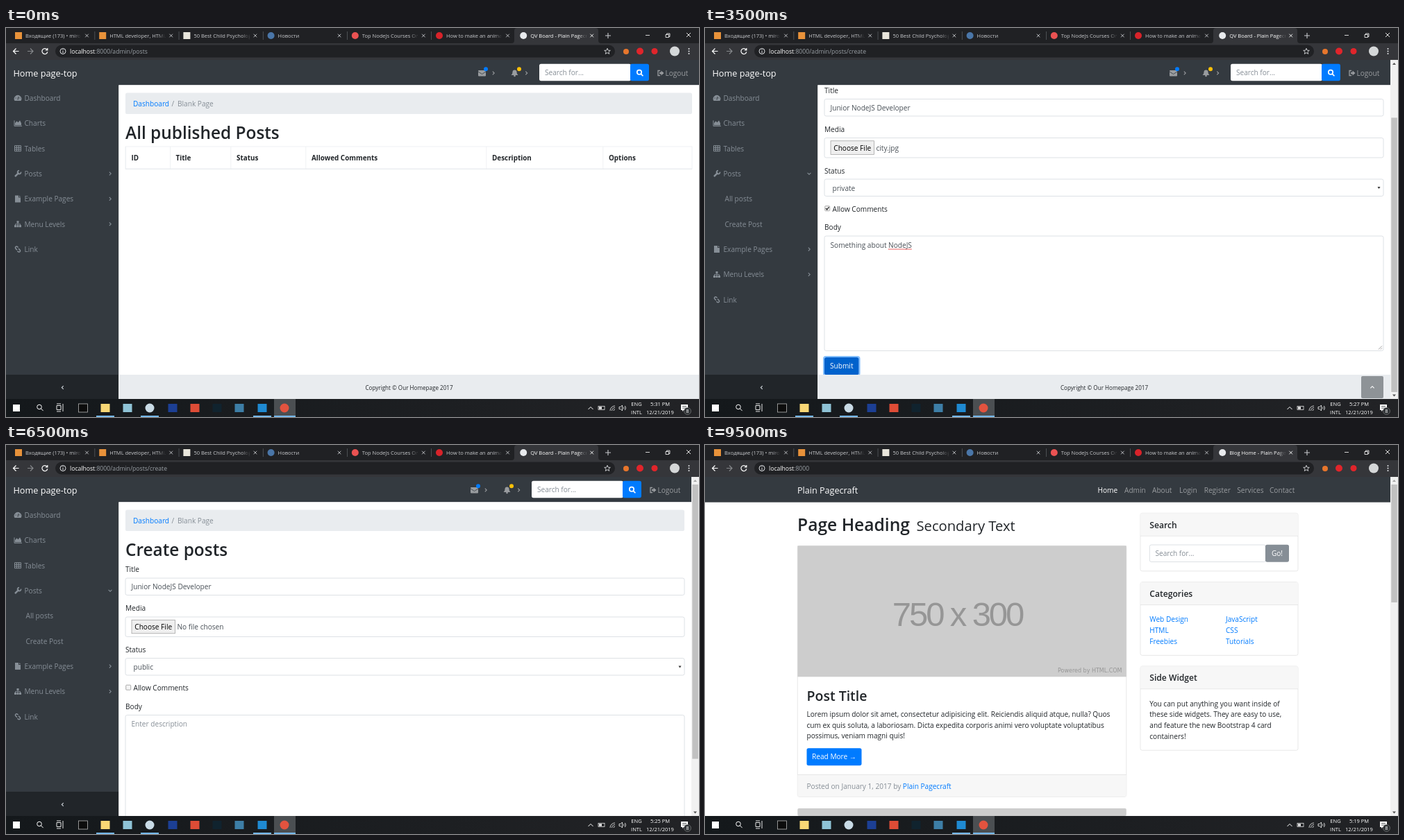
These frames come from a looping animation (998 by 561 pixels, 10 s). An HTML page:

```html
<!DOCTYPE html>
<html lang="en">
<head>
<meta charset="utf-8">
<title>Posts admin walkthrough</title>
<style>
html, body { margin: 0; height: 100%; overflow: hidden; background: #fff; }
svg { display: block; }
#stage { width: 100vw; height: 100vh; font-family: "Open Sans", "Noto Sans", sans-serif; }
</style>
</head>
<body>
<svg id="stage" viewBox="0 0 998 561"></svg>
<script>
const BLUE = '#007bff', DARK = '#343a40', INK = '#212529', GREY = '#868e96', PALE = '#e9ecef', FIELD = '#495057';
const BODY = 10.1, LEFT = 162.3, TOP = 82.3;
const brand = 'Plain Pagecraft';
const id = '5dfe39f7f0d8c414dc37040d';
const title = 'Junior NodeJS Developer';
const long = 'Something about Junior Development on NodeJS', short = 'Something about NodeJS';

// Drawing helpers
const R = (x, y, w, h, fill, more = '') => `<rect x="${x}" y="${y}" width="${w}" height="${h}" fill="${fill}" ${more}/>`;
const C = (x, y, r, fill, more = '') => `<circle cx="${x}" cy="${y}" r="${r}" fill="${fill}" ${more}/>`;
const T = (x, y, s, fill = INK, size = BODY, more = '') => `<text x="${x}" y="${y}" fill="${fill}" font-size="${size}" ${more}>${s}</text>`;
const P = (d, stroke, w = 1, fill = 'none', more = '') => `<path d="${d}" stroke="${stroke}" stroke-width="${w}" fill="${fill}" ${more}/>`;
const at = (x, y, s) => `<g transform="translate(${x} ${y})">${s}</g>`;
const clip = (x, y, w, h, s) => `<svg x="${x}" y="${y}" width="${w}" height="${h}" viewBox="${x} ${y} ${w} ${h}">${s}</svg>`;
const line = c => `stroke="${c}" stroke-width=".7"`;
const MID = 'text-anchor="middle"', SEMI = 'font-weight="600"', BOLD = 'font-weight="700"';
const chevron = (x, y, dir, c, s = 2.4) => at(x, y, `<g transform="rotate(${dir})">${P(`M${-s / 2} ${-s}L${s / 2} 0L${-s / 2} ${s}`, c, 1.1)}</g>`);
const cross = (x, y, s, c, w = .9) => P(`M${x - s} ${y - s}l${2 * s} ${2 * s}m0 ${-2 * s}l${-2 * s} ${2 * s}`, c, w);
const lens = (x, y, s, c, w) => C(x, y, s, 'none', `stroke="${c}" stroke-width="${w}"`) + P(`M${x + s * .7} ${y + s * .7}l${s} ${s}`, c, w);
const ring = (x, y, w, h, c) => R(x - 1, y - 1, w + 2, h + 2, 'none', `rx="3" stroke="${c}" stroke-width="2"`);
const field = (x, y, w, h, on) => (on ? ring(x, y, w, h, '#bfdeff') : '') + R(x, y, w, h, '#fff', `rx="2.5" ${line(on ? '#80bdff' : '#ced4da')}`);
const button = (x, y, w, s, fill, glow) => (glow ? ring(x, y, w, 25, glow) : '') +
  R(x, y, w, 25, fill, 'rx="2.6"') + T(x + w / 2, y + 16, s, '#fff', BODY, MID);

const pen = document.createElement('canvas').getContext('2d');
const width = s => {
  pen.font = BODY + 'px "Open Sans", "Noto Sans", sans-serif';
  return pen.measureText(s).width;
};

// Browser window
function browser(f) {
  const strip = f.dialog ? '#3c4043' : '#202124', bar = '#35363a';
  const soft = f.dialog ? '#a5a8ac' : '#c8cacd', ctl = f.dialog ? '#85888b' : '#fff';
  const fade = (name, c) => `<linearGradient id="${name}"><stop stop-color="${c}" stop-opacity="0"/><stop offset="1" stop-color="${c}"/></linearGradient>`;
  const tabs = [
    ['Входящие (173) • mirota', '#e8923a'], ['HTML developer, HTML jobs', '#e8923a'],
    ['50 Best Child Psychology', '#e9e6dc'], ['Новости', '#4a76a8'], ['Top NodeJs Courses Online', '#ea5252'],
    ['How to make an animation', '#d8232a'], [(f.p === home ? 'Blog Home - ' : 'QV Board - ') + brand, '#e8eaed']];
  let s = `<defs>${fade('fadeTab', strip)}${fade('fadeOn', bar)}</defs>` + R(0, 0, 998, 22, strip) +
    P('M728 22q4 0 4 -4v-14q0 -4 4 -4h113q4 0 4 4v14q0 4 4 4z', 'none', 0, bar);
  tabs.forEach(([name, c], i) => {
    const x = 18 + i * 121.2, on = i === 6;
    s += (i > 2 ? C(x, 11, 5, c) : R(x - 5, 6, 10, 10, c)) +
      clip(x + 10, 2, 80, 18, T(x + 10, 13.7, name, on ? '#fff' : soft, 7.5) + R(x + 79, 2, 11, 18, `url(#${on ? 'fadeOn' : 'fadeTab'})`)) +
      cross(x + 98.5, 11, 2.3, on ? '#fff' : soft) + (i < 5 ? R(x + 109.5, 5, .7, 12, '#5f6368') : '');
  });
  s += P('M863 11h8M867 7v8', soft, 1.1) + P('M921 10.5h6M950 9.5h4.5v4h-4.5zM951.5 9.5v-1.5h4.5v4.5h-1.5', ctl, .8) + cross(983, 10, 3, ctl);
  s += R(0, 22, 998, 24, bar) + P('M18.5 33.5h-8M14.5 29.5l-4 4 4 4', '#fff', 1.2) + P('M31 33.5h8M35 29.5l4 4 -4 4', '#85888b', 1.2) +
    P('M59 31a4 4 0 1 0 .8 3.5M59.8 29v3h-3', '#fff', 1.2) + R(71, 24.5, 806, 18, '#202124', 'rx="9"') +
    C(82, 33.5, 4, 'none', 'stroke="#e8eaed"') + P('M82 33v3M82 31v1', '#e8eaed') +
    T(92, 37, `<tspan fill="#fff">localhost</tspan>:8000${f.url || ''}`, '#9aa0a6', 8.64) +
    P('M866 29.3l1.2 2.9 3.1 .2 -2.4 2 .8 3 -2.7 -1.7 -2.7 1.7 .8 -3 -2.4 -2 3.1 -.2z', '#d5d7da', .9) +
    C(893, 34, 4, '#e8762c') + C(913, 33.5, 5, '#e1252b') + C(934, 33.5, 4.5, '#e1252b') + C(963, 33.5, 7, '#d5d7d8');
  for (const y of [30, 33.5, 37]) s += C(983.5, y, 1, '#e8eaed');
  return s;
}

function scrollbar(top, end) {
  return R(987, 46, 11, 489, '#f1f1f1') + R(988.3, top, 8.6, end - top, '#c1c1c1') +
    P('M990 53l2.5 -3 2.5 3z', 'none', 0, top > 57 ? '#505050' : '#a3a3a3') + P('M990 528.5l2.5 3 2.5 -3z', 'none', 0, '#505050');
}

function taskbar(f) {
  const icons = [[111, '#0c0c0c'], [143, '#f8d775'], [175, '#8fc3d6'], [207, '#c9dbe6', 1], [240, '#1c3f94'],
    [272, '#de4c36'], [304, '#10232e'], [336, '#3d7ea6'], [369, '#1f8ad2'], [401, '#e2533f', 1]];
  if (f.photo) icons.push([433, '#fff']);
  const open = [369];
  if (f.m > 19) open.push(207);
  if (f.m > 21) open.push(143);
  if (f.photo === 2) open.push(433);
  let s = '<defs><linearGradient id="task"><stop stop-color="#14181b"/><stop offset="1" stop-color="#222326"/></linearGradient></defs>' +
    R(0, 535, 998, 26, 'url(#task)') + R(386, 535, 31, 26, '#4b4f52') + R(386, 559, 31, 2, '#76b9ed') + R(10, 543, 10, 10, '#fff') +
    lens(48, 546.5, 3.3, '#fff', 1) + P('M73 544.5h6v6h-6zM73 542h6M73 553h6M82 542v11', '#e6e6e6');
  for (const [x, c, round] of icons)
    s += round ? C(x, 548, 6.5, c) : R(x - 6.5, 542, 13, 12, c, x === 111 ? 'stroke="#b5b5b5" stroke-width=".8"' : '');
  for (const x of open) s += R(x - 13, 559, 26, 2, '#76b9ed');
  const w = (y, t, x) => T(x, y, t, '#fff', 7.5, MID);
  return s + P('M838.5 550l3.5 -3.5 3.5 3.5', '#fff') + R(853, 545.5, 9, 5, 'none', line('#fff')) + R(854, 546.5, 4, 3, '#fff') +
    P('M870 552a7 7 0 0 1 7 -7M872.5 552a4.5 4.5 0 0 1 4.5 -4.5M875 552a2 2 0 0 1 2 -2', '#ddd', .9) +
    P('M883 546.5h2l2.5 -2.5v8l-2.5 -2.5h-2zM889.5 546.5q1 1.5 0 3M891.5 545q2 3 0 6', '#fff', .8) +
    w(545, 'ENG', 908) + w(556.5, 'INTL', 908) + w(545, `5:${f.m} PM`, 942) + w(556.5, '12/21/2019', 942) +
    P('M972 543h10v8h-6l-2 2v-2h-2z', 'none', 0, '#fff') + P('M974 545.5h6M974 548h6', '#14181b', .7) +
    C(981.5, 552.5, 5, '#2c3033', 'stroke="#888" stroke-width=".6"') + w(555.2, '8', 981.5);
}

// Admin pages
const icons = {
  Dashboard: c => P('M-4.5 4a5.3 5.3 0 1 1 9 0z', 'none', 0, c) + P('M0 2.5l1 -4.5M-3.4 0h1M2.4 0h1', DARK, 1.1),
  Charts: c => P('M-5 -4v8h11', c, 1) + P('M-4 3v-3l2.5 -3 2 2 2.5 -3 2 4v3z', 'none', 0, c),
  Tables: c => P('M-4.5 -4h9v8h-9zM-4.5 -1.3h9M-4.5 1.3h9M-1.5 -4v8M1.5 -4v8', c, 1),
  Posts: c => P('M-4 4L1.5 -1.5', c, 2.4) + P('M4.5 -2.5A2.5 2.5 0 1 1 2 -4.5', c, 1.7),
  'Example Pages': c => P('M-4 -5h5v3h3v7h-8zM2 -5l2 2h-2z', 'none', 0, c),
  'Menu Levels': c => P('M-1.5 -4.5h3v3h-3zM-5 1.5h3v3h-3zM-1.5 1.5h3v3h-3zM2 1.5h3v3h-3z', 'none', 0, c) + P('M0 -2v4M-3.5 2v-2h7v2', c, .9),
  Link: c => P('M-1 1l-2 -2a1.7 1.7 0 0 1 0 -2.5 1.7 1.7 0 0 1 2.5 0l1 1M1 -1l2 2a1.7 1.7 0 0 1 0 2.5 1.7 1.7 0 0 1 -2.5 0l-1 -1', c, 1.5)
};

function sidebar(f) {
  let s = R(0, 82, LEFT, 418, DARK) + R(0, 500, LEFT, 35, INK) + chevron(81.5, 518.5, 180, '#ced4da'), y = 101;
  const step = 36.35;
  for (const name in icons) {
    const c = f.hover === name ? '#ced4da' : GREY;
    s += at(17, y, icons[name](c)) + T(26.5, y + 4, name, c);
    if (/Posts|Pages|Levels/.test(name)) s += chevron(150, y, name === 'Posts' && f.expanded ? 90 : 0, c);
    y += step;
    if (name === 'Posts' && f.expanded) for (const sub of ['All posts', 'Create Post']) {
      s += T(28.5, y + 4, sub, f.hover === sub ? '#ced4da' : GREY);
      y += step;
    }
  }
  return s;
}

function navbar(dx) {
  const c = '#999c9f';
  return R(0, 46, 998, TOP - 46, DARK) + T(10.5, 70, 'Home page-top', '#fff', 12.7) + at(dx, 0,
    R(680, 61, 11, 8.5, c, 'rx="1"') + P('M680 63l5.5 3.5 5.5 -3.5', DARK, .8) + C(691, 59.3, 3, BLUE) + chevron(702, 65, 0, c) +
    P('M727.5 68q2 -1.5 2 -4.5 0 -3 3 -3 3 0 3 3 0 3 2 4.5z', 'none', 0, c) + C(732.5, 69, 1.3, c) + C(739, 59.3, 3, '#ffc107') + chevron(749.5, 65, 0, c) +
    R(768, 51.7, 132, 24.5, '#fff', 'rx="2.6"') + T(776, 68.2, 'Search for...', GREY) + R(899, 51.7, 27, 24.5, BLUE, 'rx="2.6"') + lens(912, 63.8, 3.2, '#fff', 1.7) +
    P('M942 61.5h-3v7h3', c, 1.3) + P('M941 63.7h2.5v-2.2l4 3.5 -4 3.5v-2.2h-2.5z', 'none', 0, c) + T(949.5, 68.7, 'Logout', c));
}

function admin(f, heading, content, max = 0) {
  const y = f.y || 0, right = max ? 977 : 988, foot = 500 + max;
  const main = R(172, 93.5, right - 172, 30.5, PALE, 'rx="2.6"') + T(183, 113, 'Dashboard', BLUE) + T(238.5, 113, '/', GREY) + T(247, 113, 'Blank Page', GREY) +
    T(172, 160, heading, INK, 24.4, SEMI) + content + R(LEFT, foot, 836, 35, PALE) +
    T((right + 173) / 2, foot + 21.7, 'Copyright © Our Homepage 2017', INK, 8.1, MID);
  let s = navbar(max ? -11 : 0) + sidebar(f) + clip(LEFT, TOP, 998 - LEFT, 535 - TOP, R(LEFT, TOP, 836, 453, '#fff') + at(0, -y, main));
  if (max) {
    const k = 468 / (489 + max);
    s += R(987, 46, 11, 489, '#fff') + scrollbar(57 + y * k, 57 + (y + 489) * k);
  }
  if (y > 65) s += R(945, 502, 32, 32, DARK, 'opacity=".5" rx="2"') + chevron(961, 518, -90, '#fff', 2.6);
  return s;
}

function list(f) {
  const cols = !f.body ? [172, 236, 323.5, 431.5, 691.5, 859.5] : f.body === long ? [172, 324, 460, 511, 627, 882] : [172, 346, 501, 559, 692, 851];
  const heads = ['ID', 'Title', 'Status', 'Allowed Comments', 'Description', 'Options'];
  const row = [id, title, 'private', 'true', f.body];
  const bottom = f.body ? 244.5 : 203.5;
  let s = R(172, 171, 816, bottom - 171, 'none', line(PALE)) + R(172, 202.6, 816, 1.3, PALE);
  cols.forEach((x, i) => {
    s += R(x, 171, .7, bottom - 171, PALE) + T(x + 8.5, 191.2, heads[i], INK, 9.9, BOLD);
    if (f.body && row[i]) s += T(x + 8.5, 223, row[i]);
  });
  if (f.body) {
    const x = cols[5] + 8;
    s += button(x, 211.5, 37, 'Edit', f.focus === 'edit' ? '#117a8b' : '#17a2b8') +
      button(x + 40, 211.5, 48, 'Delete', f.focus === 'del' ? '#c82333' : '#dc3545', f.focus === 'del' && '#eda1a8');
  }
  return admin(f, 'All published Posts', s);
}

const blank = f => admin(f, 'Blank', T(172, 180, 'This is an example of a blank page.'));

function form(f) {
  const on = name => f.focus === name, hint = (s, alt) => [s || alt, s ? FIELD : GREY];
  const d = f.edit ? -59.5 : 0, W = 805, set = f.status === 'private';
  let s = T(172, 183, 'Title') + field(172, 192, W, 24.5, on('title')) + T(180.5, 208.3, ...hint(f.title, 'Enter title'));
  if (on('title')) s += R(181 + width(f.title), 198.5, .7, 12, INK);
  if (!f.edit) s += T(172, 239.2, 'Media') + field(172, 248, W, 28.5) + R(181, 252.3, 62.5, 19.5, '#efefef', line('#999')) +
    T(212.2, 266, 'Choose File', '#000', BODY, MID) + T(246.5, 266, f.file || 'No file chosen', FIELD);
  let low = T(172, 299, 'Status') + field(172, 307.5, W, 24.5, f.open) + T(183.5, 324, f.status || 'public', FIELD) +
    P('M968.5 318.5h4l-2 3z', 'none', 0, '#333') +
    R(172.7, 346.2, 7, 7, '#f4f4f4', 'rx="1" ' + line('#8a8a8a')) + (set ? P('M174 349.5l1.7 2 2.8 -4', '#222', 1.3) : '') + T(183.5, 354.3, 'Allow Comments') +
    T(172, 380.7, 'Body') + field(172, 389.5, W, 165.5, on('body')) + T(180.5, 406, ...hint(f.body, 'Enter description')) +
    P('M970 553l5 -5M973 553l2 -2', '#777', .7) +
    button(172, 564.5, 49.5, 'Submit', on('submit') ? '#0062cc' : BLUE, on('submit') && '#80bdff');
  if (f.body) {
    const end = 180.5 + width(f.body), word = width('NodeJS');
    low += P(`M${end - word} 408.5h${word}`, '#e01010', 1, 'none', 'stroke-dasharray="1.3 .7"');
    if (on('body')) low += R(end + .3, 396, .7, 13, INK);
  }
  if (f.open) {
    low += R(172, 332, W, 44, '#fff', line('#7a9cc0')) + R(172.4, 332, W - .8, 14.6, '#1e90ff');
    ['public', 'private', 'draft'].forEach((t, i) => low += T(183.5, 343.3 + i * 14.6, t, i ? FIELD : '#fff'));
  }
  return admin(f, f.edit ? 'Edit posts' : 'Create posts', s + at(0, d, low), 89.5 + d);
}

// File picker
function dialog(picked) {
  const w = (x, y, t, more) => T(x, y, t, '#f2f2f2', 7.4, more), box = (x, y, wd, h, fill, c) => R(x, y, wd, h, fill, line(c));
  const tree = [['This PC', '#4aa8dc'], ['3D Objects', '#35b5cf'], ['Desktop', '#1a9bf0'], ['Documents', '#b9d3e3'], ['Downloads', '#2b8de0'], ['Music', '#2a9df4'],
    ['Pictures', '#9cc4dc'], ['Videos', '#8a8fa8'], ['Local Disk (C:)', '#c8ccd0'], ['Local Disk (D:)', '#c8ccd0'], ['New Volume (E:)', '#c8ccd0']];
  let nav = R(355, 232.3, 90, 14.7, '#3d3d3d');
  tree.forEach(([t, c], i) => {
    const x = i ? 388 : 383, y = 208.5 + i * 15.6;
    nav += R(x - 12, y - (i > 7 ? 1 : 3.5), 9, i > 7 ? 4 : 7, c, 'rx="1"') + w(x, y + 2.8, t);
  });
  nav += R(371, 380, 9, 7, '#4aa8dc') + w(383, 387.5, 'Network');
  let photo = R(472.5, 223.5, 57, 36.5, 'url(#dusk)');
  for (let i = 0; i < 14; i++) {
    const h = 8 + 7 * Math.abs(Math.sin(i * 2.3));
    photo += R(473 + i * 4, 260 - h, 3.6, h, i % 2 ? '#40364a' : '#5a4650');
  }
  photo += P('M499 260v-20l2 -7 2 7v20z', 'none', 0, '#4b3f4d');
  return '<defs><linearGradient id="dusk" x2="0" y2="1"><stop stop-color="#54505c"/><stop offset=".45" stop-color="#d59a6c"/><stop offset="1" stop-color="#4a3540"/></linearGradient></defs>' +
    '<g style="filter:drop-shadow(0 2px 5px #0008)">' + R(354.4, 129.4, 490, 306.5, '#202020', line('#5a5a5a')) + '</g>' +
    R(355, 130, 489, 19, '#000') + C(364.5, 139, 4.3, '#e2533f') + w(372, 141.8, 'Open') + cross(833, 139, 3, '#fff') + R(355, 149, 489, 46, '#191919') +
    P('M371 161.5h-7.5M366.5 158.5l-3 3 3 3M383 161.5h7.5M387.5 158.5l3 3 -3 3', '#8d8d8d') + chevron(402.5, 161.5, 90, '#8d8d8d') +
    P('M416 165.5v-7.5M413 161l3 -3 3 3', '#fff', 1.2) + box(423.5, 151.5, 277, 19.5, '#191919', '#535353') + R(426, 157.5, 9.5, 7, '#1a9bf0') +
    chevron(442, 161, 0, '#ccc', 1.8) + w(449, 164, 'This PC') + chevron(480.5, 161, 0, '#ccc', 1.8) + w(487.5, 164, 'Desktop') + chevron(667.5, 161.5, 90, '#ccc') +
    P('M691.5 159.5a3.3 3.3 0 1 0 .6 2.5M692 158v2.2h-2.2', '#bbb', .9) + box(706.5, 151.5, 131, 19.5, '#191919', '#535353') +
    at(720, 160.5, '<g transform="scale(-1 1)">' + lens(0, 0, 2.7, '#999', .8) + '</g>') + T(732.5, 164, 'Search Desktop', '#9a9a9a', 7.4) +
    w(365.5, 188, 'Organize') + P('M400 184l2 2.2 2 -2.2z', 'none', 0, '#eee') + w(423, 188, 'New folder') +
    R(765.5, 181.5, 9, 7, '#b8d8ea') + P('M781.5 184l2 2.2 2 -2.2z', 'none', 0, '#eee') + R(800.5, 181.5, 9, 7, '#fff') + R(805.5, 182.5, 3.5, 5.5, '#2b8de0') +
    C(829, 185, 4.6, '#0a6cd6') + w(829, 188, '?', MID) +
    R(355, 195, 101, 189, '#191919') + clip(355, 195, 90, 189, nav) + R(445, 195, 11, 189, '#171717') + R(445.5, 273, 10, 92, '#4d4d4d') +
    chevron(450.5, 200.5, -90, '#aaa') + chevron(450.5, 378.5, 90, '#aaa') + (picked ? R(468.5, 200, 67, 75.5, '#333') : '') + photo + w(502, 271.5, 'city.jpg', MID) +
    R(355, 384, 489, 51.5, '#383838') + w(466.5, 402.3, 'File <tspan text-decoration="underline">n</tspan>ame:', 'text-anchor="end"') +
    box(469.5, 392.5, 234, 14.5, '#383838', '#8a8a8a') + (picked ? w(471.5, 402.3, 'city.jpg') : '') + chevron(698.5, 399.7, 90, '#aaa') +
    box(711.5, 392.5, 122, 14.5, '#383838', '#8a8a8a') + w(714, 402.3, 'All Files (*.*)') + chevron(828, 399.7, 90, '#aaa') +
    box(711.5, 411.3, 57, 16.5, '#666', '#b0b0b0') + w(740, 422.3, '<tspan text-decoration="underline">O</tspan>pen', MID) +
    box(776.5, 411.3, 57, 16.5, '#333', '#d0d0d0') + w(805, 422.3, 'Cancel', MID) +
    P('M842 429.5v5M839.5 432v2.5M837 434.5v-1.5', '#aaa', 1.2, 'none', 'stroke-dasharray="1.3 1"');
}

// Public blog page
function home() {
  const edge = line('#dfdfdf'), lines = (x, y, rows) => rows.map((t, i) => T(x, y + i * 15.6, t)).join('');
  const card = (y, h, name) => R(627, y, 227, h, '#fff', 'rx="2.6" ' + edge) + R(627.3, y + .3, 226.4, 32.4, '#f7f7f7') +
    R(627, y + 32.5, 227, .7, '#dfdfdf') + T(640.3, y + 21.3, name, INK, 12.1, SEMI);
  let s = R(0, 46, 987, 36.6, DARK) + T(133, 70, brand, '#fff', 12.6);
  [['Home', 565.5], ['Admin', 604], ['About', 644], ['Login', 683], ['Register', 718.7], ['Services', 766.3], ['Contact', 813]]
    .forEach(([t, x], i) => s += T(x, 68.8, t, i ? '#999c9f' : '#fff'));
  s += T(133, 124, 'Page Heading', INK, 24.6, SEMI) + T(304.5, 124, 'Secondary Text', INK, 20.2) +
    R(133.3, 145.3, 473.5, 362, '#fff', 'rx="2.6" ' + edge) + R(133.3, 145.3, 473.5, 189, '#cdcdcd') +
    T(363.5, 261, '750 x 300', '#969696', 49, MID + ' font-family="Liberation Sans, Arial, sans-serif" letter-spacing="-3.1"') +
    T(600.5, 328, 'Powered by HTML.COM', '#969696', 8, 'text-anchor="end" font-family="DejaVu Sans, sans-serif"') +
    T(146.5, 368.5, 'Post Title', INK, 19.5, SEMI) +
    lines(146.5, 392.2, ['Lorem ipsum dolor sit amet, consectetur adipisicing elit. Reiciendis aliquid atque, nulla? Quos',
      'cum ex quis soluta, a laboriosam. Dicta expedita corporis animi vero voluptate voluptatibus', 'possimus, veniam magni quis!']) +
    button(146.5, 437.2, 79, 'Read More →', BLUE) + R(133.6, 475.3, 472.9, 31.6, '#f7f7f7') + R(133.3, 475, 473.5, .7, '#dfdfdf') +
    T(146.5, 495.7, `Posted on January 1, 2017 by <tspan fill="${BLUE}">${brand}</tspan>`, GREY) + R(133.3, 524, 473.5, 11, '#cdcdcd', 'rx="2"') +
    card(98.3, 83.5, 'Search') + field(640.3, 144, 167, 24.5) + T(648.5, 160, 'Search for...', GREY) + button(807, 143.7, 34, 'Go!', GREY) +
    card(197.7, 105.7, 'Categories') + card(319, 121.3, 'Side Widget') +
    lines(640.3, 376.8, ['You can put anything you want inside of', 'these side widgets. They are easy to use,', 'and feature the new Bootstrap 4 card', 'containers!']);
  ['Web Design', 'HTML', 'Freebies', 'JavaScript', 'CSS', 'Tutorials']
    .forEach((t, i) => s += T(i < 3 ? 640.3 : 750, 255.3 + i % 3 * 15.6, t, BLUE));
  return s + scrollbar(57, 227);
}

// One step every 500 ms
const posts = { p: list, url: '/admin/posts' };
const edit = { p: form, edit: 1, url: '/admin/posts/edit/' + id, title, status: 'private', body: long };
const create = { p: form, url: '/admin/posts/create', expanded: 1 };
const filled = { ...create, title, file: 'city.jpg', status: 'private', y: 89.5 };
const steps = [
  { ...posts, m: 31 },
  { ...posts, m: 30, body: long, focus: 'del' },
  { ...posts, m: 30, body: long },
  { ...edit, m: 30, y: 30, focus: 'submit' },
  { ...edit, m: 29, y: 19, focus: 'body' },
  { ...posts, m: 28, body: short, focus: 'edit', link: edit.url },
  { ...posts, m: 28, body: short },
  { ...filled, m: 27, body: short, focus: 'submit' },
  { ...filled, m: 27, body: short, focus: 'body' },
  { ...filled, m: 26 },
  { ...create, m: 26, title, file: 'city.jpg', open: 1 },
  { ...create, m: 26, title, dialog: 2 },
  { ...create, m: 25, title, dialog: 1 },
  { ...create, m: 25, title },
  { ...create, m: 24, title, focus: 'title', photo: 1 },
  { ...create, m: 23, hover: 'Create Post', link: create.url, photo: 2 },
  { ...posts, m: 22 },
  { p: blank, url: '/admin', m: 21, expanded: 1, hover: 'Posts' },
  { p: blank, url: '/admin', m: 20, hover: 'Posts', link: '/admin#' },
  { p: home, m: 19 }
];

function linkHint(path) {
  const t = 'localhost:8000' + path, w = width(t) * .735 + 6;
  return R(-1, 522, w + 1, 14, '#35363a', line('#55575b')) + T(2.5, 531, t, '#c4c7cb', 7.42);
}

const stage = document.getElementById('stage');
let shown = -1;
function draw(now) {
  const n = Math.floor(now / 500) % steps.length;
  if (n !== shown) {
    const f = steps[shown = n];
    stage.innerHTML = R(0, 0, 998, 561, '#fff') + f.p(f) + browser(f) + (f.link ? linkHint(f.link) : '') +
      taskbar(f) + (f.dialog ? dialog(f.dialog === 2) : '');
  }
  requestAnimationFrame(draw);
}
draw(0);
</script>
</body>
</html>
```
